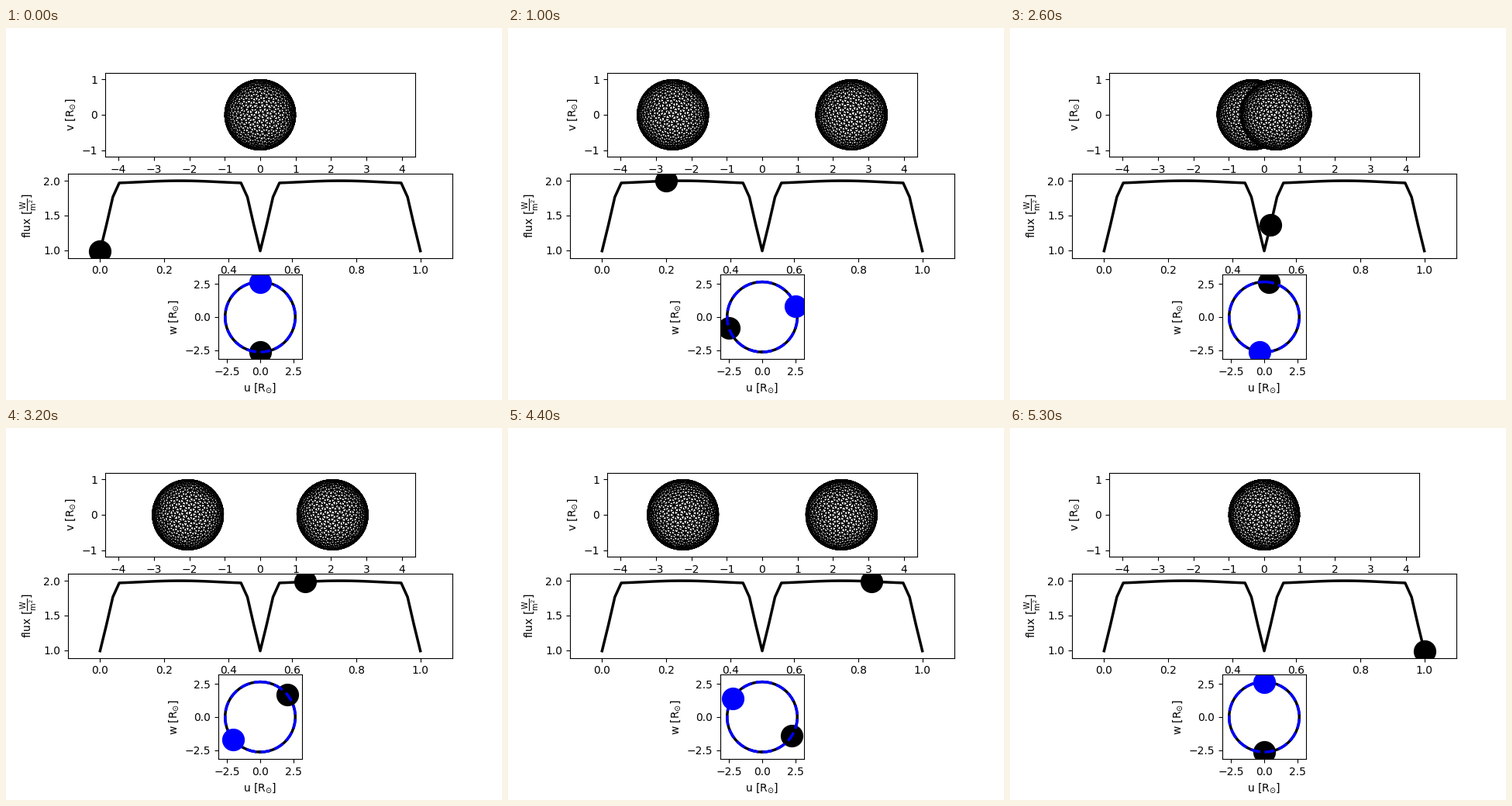
Recreate the animation shown at these times as a matplotlib script. Size 640 by 480 pixels, loop 5400 ms.

```python
import numpy as np
import matplotlib.pyplot as plt
from matplotlib.animation import FuncAnimation
from matplotlib.collections import PolyCollection
from matplotlib.tri import Triangulation

ORBIT = 2.65
SHAPE = np.array([1.006, 0.997, 0.991])   # semi-axes: to companion, sideways, spin
POINTS = 752
STEPS = 50
HOLDS = (36, 43, 50)                      # ticks that repeat the previous pose


def sphere_points(n):
    """Evenly spread but slightly irregular points on the unit sphere."""
    rng = np.random.default_rng(4)
    i = np.arange(n) + 0.5
    z = 1 - 2 * i / n
    lon = i * np.pi * (3 - np.sqrt(5))
    r = np.sqrt(1 - z**2)
    pts = np.column_stack([r * np.cos(lon), r * np.sin(lon), z])
    pts += rng.normal(0, 0.04, pts.shape)
    pts /= np.linalg.norm(pts, axis=1, keepdims=True)
    reach = 0.8 * np.sqrt(14.5 / n)
    for _ in range(40):
        push = np.exp(-(2 - 2 * pts @ pts.T) / reach**2)
        pts = pts + 0.3 * (pts * push.sum(1, keepdims=True) - push @ pts)
        pts /= np.linalg.norm(pts, axis=1, keepdims=True)
    return pts


def sphere_faces(pts):
    """Convex hull: Delaunay in stereographic projection, closed at the last point."""
    pole = pts[-1]
    base = np.linalg.qr(np.column_stack([pole, np.eye(3)[:, :2]]))[0]
    rest = pts[:-1]
    flat = rest @ base[:, 1:] / (1 - rest @ pole)[:, None]
    tri = Triangulation(flat[:, 0], flat[:, 1])
    t, e = np.nonzero(tri.neighbors == -1)
    a, b = tri.triangles[t, e], tri.triangles[t, (e + 1) % 3]
    cap = np.column_stack([a, b, np.full(len(a), len(pts) - 1)])
    return np.vstack([tri.triangles, cap])


def position(phase, side):
    ang = 2 * np.pi * phase
    return -side * ORBIT * np.sin(ang), -side * ORBIT * np.cos(ang)


def flux(phase):
    off = np.abs((phase + 0.25) % 0.5 - 0.25)
    out = 2.003 - 0.036 * np.cos(2 * np.pi * phase)**2
    dip = np.interp(off, [0, 0.02, 0.04, 0.06], [0.987, 1.365, 1.768, 1.972])
    return np.where(off < 0.05, dip, out)


points = sphere_points(POINTS)
mesh = (points * SHAPE)[sphere_faces(points)]


def star(phase, side):
    """Triangles of one star as (u, v, w)."""
    u, w = position(phase, side)
    du, dw = -u / ORBIT, -w / ORBIT
    x, y, z = mesh[..., 0], mesh[..., 1], mesh[..., 2]
    return np.stack([u + x * du + y * dw, z, w + x * dw - y * du], axis=-1)


fig, (sky, curve, orbit) = plt.subplots(3, 1, figsize=(6.4, 4.8), dpi=100)
phases = np.linspace(0, 1, STEPS + 1)
SUN = r"[$\mathrm{R_{\odot}}$]"

sky.set(xlim=(-4.376, 4.376), ylim=(-1.189, 1.189), aspect="equal",
        xticks=range(-4, 5), yticks=(-1, 0, 1), ylabel="v " + SUN)
stars = PolyCollection([], facecolors="white", edgecolors="black", linewidths=1)
sky.add_collection(stars, autolim=False)

curve.set(xlim=(-0.1, 1.1), ylim=(0.8854, 2.1046), yticks=(1, 1.5, 2),
          ylabel=r"flux [$\mathrm{\frac{W}{m^{2}}}$]")
curve.plot(phases, flux(phases), "k-", lw=2.5)

lim = 1.2 * ORBIT
orbit.set(xlim=(-lim, lim), ylim=(-lim, lim), aspect="equal",
          xticks=(-2.5, 0, 2.5), yticks=(-2.5, 0, 2.5),
          xlabel="u " + SUN, ylabel="w " + SUN)


def dot(ax, color):
    return ax.plot([], [], "o", color=color, ms=20)[0]


now = dot(curve, "black")
bodies = []
for side, color, style in ((1, "black", "-"), (-1, "blue", "--")):
    orbit.plot(*position(phases, side), color=color, ls=style, lw=2.5)
    bodies.append((side, dot(orbit, color)))


def update(tick):
    phase = (tick - sum(tick >= h for h in HOLDS)) / STEPS
    faces = np.concatenate([star(phase, 1), star(phase, -1)])
    order = np.argsort(faces[..., 2].mean(axis=1))
    stars.set_verts(faces[order][..., :2])
    now.set_data([phase], [flux(phase)])
    for side, body in bodies:
        u, w = position(phase, side)
        body.set_data([u], [w])
    return [stars, now] + [body for _, body in bodies]


anim = FuncAnimation(fig, update, frames=54, interval=100, repeat=True,
                     repeat_delay=0, blit=False)
plt.show()
```
